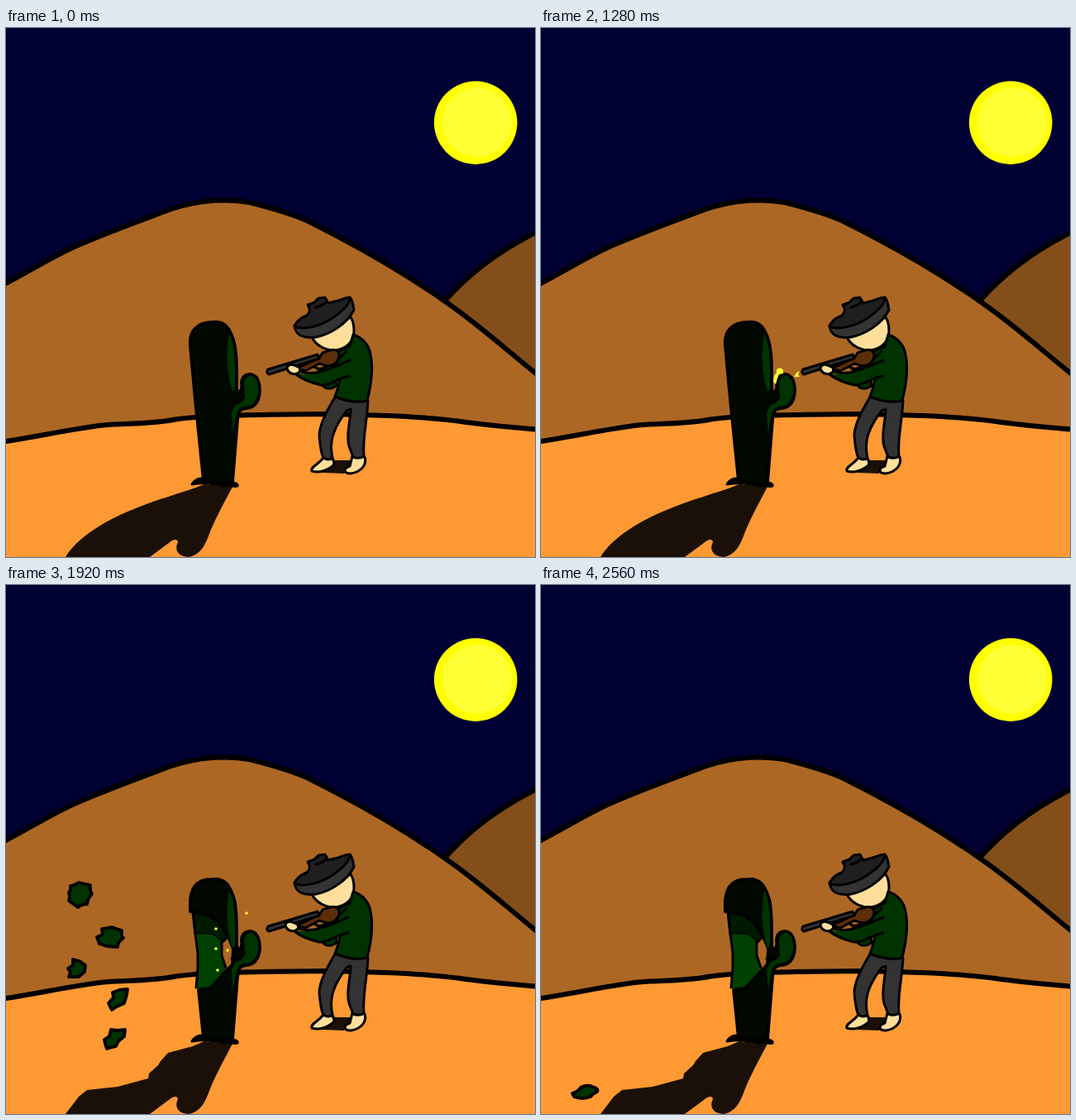
These frames come from a looping animation (640 px wide and 640 px high, 2720 ms). An HTML page:

```html
<!DOCTYPE html>
<html lang="en">
<head>
<meta charset="utf-8">
<title>Desert shot</title>
<style>
html, body { margin: 0; width: 100%; height: 100%; overflow: hidden; background: #000033; }
svg { display: block; width: 100%; height: 100%; }
.ink { stroke: #000; stroke-width: 3; stroke-linecap: round; stroke-linejoin: round; }
.bold { stroke-width: 3.8; }
.line { fill: none; }
.grey { fill: #333; }
.green { fill: #003300; }
.skin { fill: #ffdf9b; }
.wood { fill: #5c2e0a; }
.night { fill: #000800; }
.shade { fill: #1b1007; }
.fire { fill: #ffff33; }
.dots { fill: none; stroke: #ffff33; stroke-width: 3.6; stroke-linecap: round; }

/* 17 steps of 160 ms; --n is the step at which a part appears */
.at { visibility: hidden; animation: one 2720ms calc(var(--n) * 160ms - 2720ms) step-end infinite; }
.two { animation-name: two; }
.eight { animation-name: eight; }
.nine { animation-name: nine; }
.eleven { animation-name: eleven; }
@keyframes one { 0% { visibility: visible } 5.882%, 100% { visibility: hidden } }
@keyframes two { 0% { visibility: visible } 11.764%, 100% { visibility: hidden } }
@keyframes eight { 0% { visibility: visible } 47.058%, 100% { visibility: hidden } }
@keyframes nine { 0% { visibility: visible } 52.941%, 100% { visibility: hidden } }
@keyframes eleven { 0% { visibility: visible } 64.705%, 100% { visibility: hidden } }
</style>
</head>
<body>
<svg viewBox="0 0 640 640" preserveAspectRatio="none">
<defs>
  <g id="sleeve" class="ink green">
    <path stroke="none" d="M350 418L361 419C376 417 389 414 414 402L423 412L413 422C400 425 393 433 380 432C368 429 357 425 350 418Z"/>
    <path class="line" d="M414 402C400 408 386 415 372 417C364 418 358 418 353 415L349 419C356 425 367 429 379 432C392 433 398 423 414 421"/>
    <path class="skin" d="M338 412C338 407 344 406 349 409C354 410 355 414 352 417C348 420 340 419 338 412Z"/>
  </g>
  <g id="elbow" class="ink green">
    <path d="M370 407C375 413 382 414 388 409L399 407L403 420L385 419Z"/>
    <path d="M382 431L399 424L400 433C394 437 386 438 382 431Z"/>
  </g>
  <g id="lit" class="green">
    <path d="M270 370C276 379 278 402 277 437L274 439C267 420 266 392 270 370Z"/>
    <path d="M278 456C289 454 290 444 288 433C288 424 293 420 298 421C305 424 306 435 305 442C302 455 296 458 286 458C279 461 277 472 275 492L273 465Z"/>
    <path class="ink line" d="M273 452C282 454 287 450 288 446"/>
  </g>
  <path id="a" d="M76 372Q79 369 78 364Q84 363 88 360Q96 362 102 363Q101 368 104 374Q99 379 98 386Q91 386 87 390Q82 386 76 382Q78 377 76 372Z"/>
  <path id="b" d="M110 426L117 423L116 416L128 414L140 418L140 426L142 427L136 433L135 438L122 437L113 434Z"/>
  <path id="c" d="M75 464L81 460L81 453L89 455L96 460L95 468L88 474L76 474L78 468Z"/>
  <path id="d" d="M124 506L130 499L129 493L137 490L147 489L146 496L143 506L134 510L128 514Z"/>
  <path id="e" d="M119 550L125 546L127 538L135 539L144 538L143 546L136 552L133 558L122 561L120 555Z"/>
  <path id="e2" d="M55 605Q63 603 68 596Q80 592 88 594Q91 598 89 602Q82 604 79 608Q69 612 60 610Z"/>
</defs>

<!-- scenery -->
<rect width="640" height="640" fill="#000033"/>
<circle cx="568.2" cy="114.6" r="50.3" fill="#ffff00"/>
<circle cx="570" cy="114" r="42" fill="#ffff33"/>
<g stroke="#000" stroke-width="6" stroke-linejoin="round">
  <path fill="#844e1a" d="M530 331C560 297 598 268 646 245V430Z"/>
  <path fill="#ad6724" d="M-6 312C22 298 50 280 80 266C118 249 160 234 200 219C232 208 268 206 295 211C318 217 342 223 364 233C412 257 476 292 530 330C570 357 606 390 646 422V650H-6Z"/>
  <path fill="#ff9933" d="M-6 501C40 494 85 484 118 480.500C150 478 178 479 205 473.500C255 467 325 468 382 467C460 468 515 471 550 476C583 481 615 483 646 486V650H-6Z"/>
</g>

<!-- cactus before the hit -->
<g class="at nine" style="--n:0">
  <path class="shade" d="M240 552L274 555C263 576 253 594 246 612C241 626 235 637 222 640C209 640 203 632 208 622C207 617 202 619 197 623L174 640H72C85 619 111 601 145 586C181 570 213 563 240 552Z"/>
  <path class="ink bold night" d="M223 385C221 366 232 356 250 356C266 354 271 365 275 377C280 394 279 417 279 440C285 441 286 436 285 430C285 422 290 418 297 419C306 421 307 432 307 440C306 454 299 460 290 460C282 461 281 465 280 475L274 550Q256 553 239 548L229 450Z"/>
  <use href="#lit"/>
</g>

<!-- cactus after the hit -->
<g class="at eight" style="--n:9">
  <path class="shade" d="M240 552L274 555C263 576 253 594 246 612C241 626 235 637 222 640C209 640 203 632 208 622C207 617 202 619 197 623L174 640H72L88 619L98 611L135 607L172 597L173 591L184 581L187 576L196 566L226 558Z"/>
  <path class="ink" fill="#001a00" d="M226 396L246 398L260 410L268 426L262 432L250 423L229 422Z"/>
  <path fill="#004000" d="M229 422L250 423L261 431L261 448L266 463L257 480L247 488H231L232 463Z"/>
  <path class="ink line" d="M227 398L229 422L232 445L232 464L230 487M261 431L261 448L266 463"/>
  <path class="ink bold night" d="M223 395C221 366 230 356 250 356C267 354 272 367 276 380C280 395 279 417 279 440C285 441 286 436 285 430C285 422 290 418 297 419C306 421 307 432 307 440C306 454 299 460 290 460C282 461 281 465 280 475L274 550Q256 553 239 548L233 490L247 488L260 474L274 459L275 440L268 423L258 409L245 399Z"/>
  <use href="#lit"/>
</g>
<path class="ink" d="M225 552C229 546 235 544 241 546L243 550C251 553 261 553 272 550C278 550 281 552 280 554C275 556 270 552 264 554C252 551 237 550 225 552Z"/>

<!-- shooter -->
<g class="ink">
  <path class="shade" stroke="none" d="M382 538L396 523H419L409 539Z"/>
  <path class="skin" d="M384 520L396 522L397 528C390 535 379 539 370 536C368 531 377 529 384 520Z"/>
  <path class="skin" d="M419 518L434 519C437 528 430 537 417 539C409 539 407 533 416 530Z"/>
  <path class="grey" d="M399 445C391 458 379 479 379 493C380 506 381 514 384 520Q390 524 395 520C391 502 395 488 407 470L412 463L417 461C417 474 411 493 415 506L420 519Q427 522 433 518C431 497 437 475 438 451Z"/>
  <path class="skin" d="M370 374C375 384 386 390 398 390C413 388 421 379 421 366C421 359 419 353 417 350Z"/>
  <path class="grey" d="M349 360C353 355 358 350 364 348L397 332C404 330 410 326 416 326C419 328 420 335 421 341C412 359 391 371 375 374C360 376 350 372 349 360Z"/>
  <path fill="#1f1f1f" d="M349 361C352 354 358 350 364 348C368 344 368 339 365 335L373 332L378 327L386 326L390 333L397 331C404 330 410 326 416 326C417 335 402 347 390 354C374 363 356 365 349 361Z"/>
  <path class="line" d="M375 338L383 335L387 332"/>
  <path class="green" d="M420 371C433 375 440 386 441 395C445 413 441 435 437 451C424 454 410 451 398 446C401 437 404 431 404 422L400 406L403 391L416 385Z"/>
</g>

<!-- rear arm, rifle and front arm -->
<g class="at" style="--n:0"><use href="#elbow"/></g>
<g class="at" style="--n:1"><use href="#elbow"/></g>
<g class="at" style="--n:2"><use href="#elbow" x="2" y="1"/></g>
<g class="at" style="--n:3"><use href="#elbow" x="1" y="1"/></g>
<g class="at two" style="--n:4"><use href="#elbow"/></g>
<g class="at eleven" style="--n:6"><use href="#elbow"/></g>
<g class="ink">
  <path class="wood" d="M352 412L379 399L383 393C391 390 397 387 402 392C405 398 402 404 396 407C388 411 384 407 379 406L362 415Z"/>
  <path class="grey" d="M317 413L377 395L379 400L318 419Q314 417 317 413Z"/>
  <path class="line" d="M412 391L401 402"/>
</g>
<g class="at" style="--n:0"><use href="#sleeve" x="2"/></g>
<g class="at" style="--n:1"><use href="#sleeve" x="8" y="-2"/></g>
<g class="at" style="--n:2"><use href="#sleeve" x="14" y="-3"/></g>
<g class="at" style="--n:3"><use href="#sleeve" x="7" y="-1"/></g>
<g class="at two" style="--n:4">
  <path class="ink skin" d="M372 409C376 404 383 406 387 409C384 414 376 413 372 409Z"/>
  <use href="#sleeve"/>
</g>
<g class="at eleven" style="--n:6"><use href="#sleeve"/></g>

<!-- muzzle flash -->
<path class="at fire" style="--n:6" d="M318 412L313 415L314 420L318 418Z"/>
<path class="at fire" style="--n:7" d="M316 413L309 413L310 417L303 419L310 421L309 425L316 420Z"/>
<g class="at fire" style="--n:8">
  <path d="M285 417C284 411 290 410 293 414L293 418L288 419L286 424L284 431L281 428L282 421Z"/>
  <path d="M313 415L309 417L306 422L313 422L311 419Z"/>
</g>

<!-- flying pieces -->
<g class="ink bold green">
  <g class="at" style="--n:9">
    <path d="M229 403L240 398L251 404L249 420L237 426L228 417Z"/>
    <path d="M240 421L254 419L260 434L249 440L239 436Z"/>
    <path d="M230 442L240 435L244 449L234 458Z"/>
    <path d="M239 449L255 448L257 462L241 464Z"/>
    <path d="M231 473L246 467L252 478L237 487Z"/>
  </g>
  <g class="at" style="--n:10">
    <path d="M204 401L210 397L222 399L230 404L228 413L222 418L222 424L213 424L205 416Z"/>
    <path d="M236 419L247 416L256 421L258 434L249 438L236 438L229 430Z"/>
    <path class="line" d="M236 419L240 428L236 438M247 416L251 427L249 438"/>
    <path d="M205 455L209 450L208 444L216 443L221 452L215 459L205 459Z"/>
    <path d="M231 449L243 446L253 450L252 460L240 462L230 458Z"/>
    <path d="M206 486L212 476L222 474L227 478L238 477L238 484L225 486L212 489Z"/>
  </g>
  <g class="at" style="--n:11">
    <use href="#a" x="73" y="20"/>
    <use href="#b" x="61" y="1"/>
    <use href="#c" x="73" y="-7"/>
    <use href="#d" x="55" y="-24"/>
    <use href="#e" x="47" y="-39"/>
  </g>
  <g class="at" style="--n:12">
    <use href="#a"/><use href="#b"/><use href="#c"/><use href="#d"/><use href="#e"/>
  </g>
  <g class="at" style="--n:13">
    <path d="M-8 327L6 324L13 328L19 329L18 339L11 342L5 347L-8 346Z"/>
    <path d="M1 413L8 410L10 404L20 404L33 405L38 413L32 420L30 425L10 426L7 421Z"/>
    <path d="M-8 463L3 464L4 470L8 475L2 486L-8 488Z"/>
    <path d="M31 543L38 539L41 532L50 533L59 540L56 545L50 547L46 552L35 552Z"/>
    <use href="#e2"/>
  </g>
  <g class="at" style="--n:14">
    <path d="M-8 406L3 407L7 414L2 423L-8 425Z"/>
    <path d="M-8 570L4 569L10 578L3 587L-8 589Z"/>
    <use href="#e2" x="-10" y="9"/>
  </g>
  <g class="at" style="--n:15"><path d="M44 615Q50 610 52 605Q63 599 72 600Q78 604 77 608Q69 613 66 617Q55 622 46 620Z"/></g>
  <g class="at" style="--n:16"><path d="M38 615Q45 613 48 608Q56 604 62 607Q70 609 68 613Q63 615 60 619Q50 623 40 619Z"/></g>
</g>

<!-- sparks -->
<path class="at dots" style="--n:9" d="M273 426v5M270 439v3M274 452v2M287 411h0M294 421h0M299 431h0"/>
<path class="at dots" style="--n:10" d="M282 407h0M281 421v1M279 433h0M264 427l1 2M266 439v2M264 455v3M290 464h0M298 464h0"/>
<path class="at dots" style="--n:11" d="M287 401h0M268 420h0M261 433h0M267 445h0M260 460h0M299 465h0"/>
<path class="at dots" style="--n:12" d="M291 397h0M254 416h0M254 440h0M268 442h0M256 466h0"/>
<path class="at dots" style="--n:13" d="M248 437h0"/>
</svg>
</body>
</html>
```
